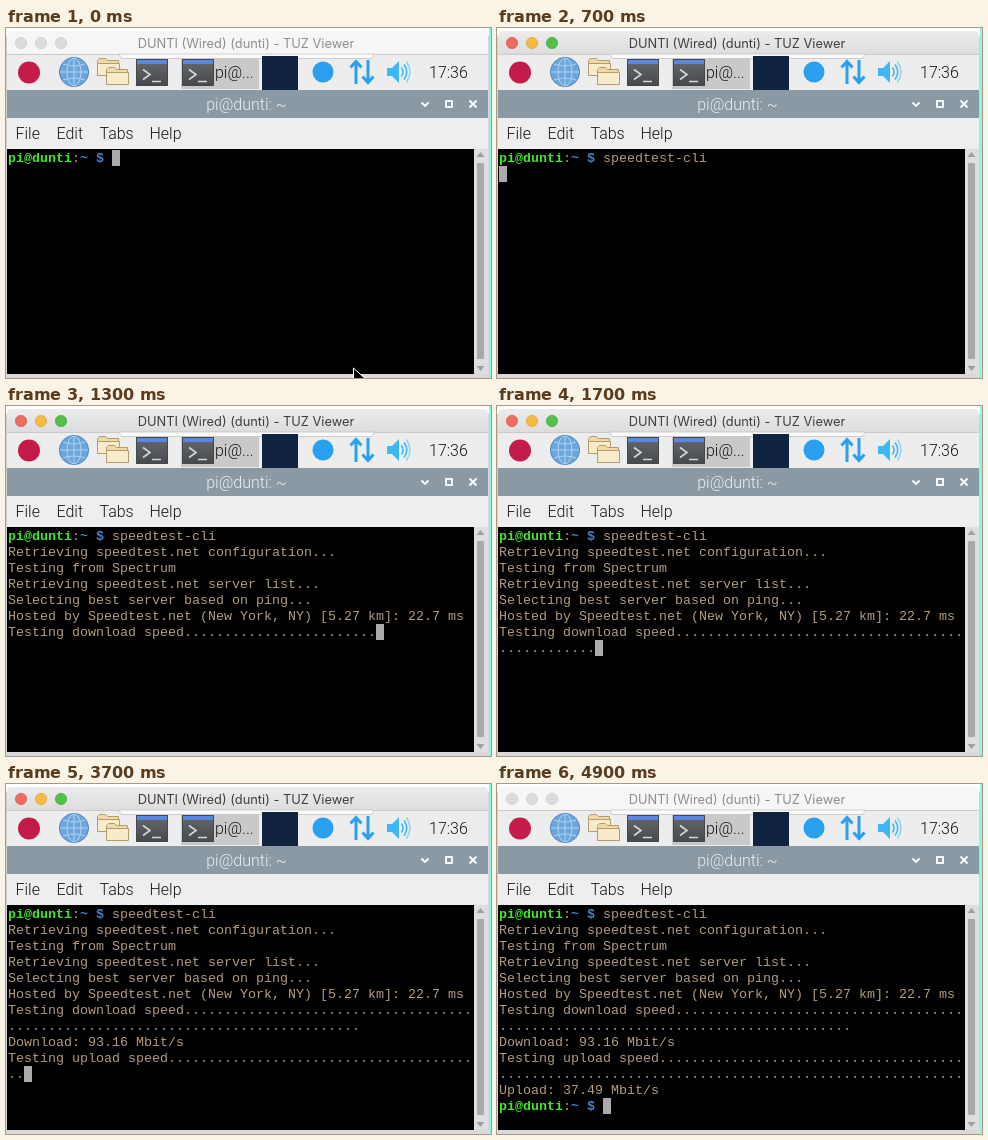
Recreate the animation shown at these times as an HTML page. Size 485x350 px, loop 5 s.

```html
<!DOCTYPE html>
<html lang="en">
<head>
<meta charset="utf-8">
<title>Speed test in a remote terminal</title>
<style>
  html, body { margin: 0; width: 100%; height: 100%; overflow: hidden; background: #fff; }
  #stage { position: absolute; left: 0; top: 0; width: 485px; height: 350px; overflow: hidden; }
  svg { position: absolute; left: 0; top: 0; }
  .ui { font: 300 16px Roboto, sans-serif; fill: #161616; }
  .shade { animation: shade 5s step-end infinite; }
  .caption { font: 400 12.85px Inter, sans-serif; fill: #3f3f3f; animation: caption 5s step-end infinite; }
  .light { animation: light 5s step-end infinite; }
  .pointer { animation: pointer 5s step-end infinite; }
  @keyframes shade { 0%, 98% { opacity: 0; } 2% { opacity: 1; } }
  @keyframes caption { 0%, 98% { fill: #8e8e8e; } 2% { fill: #3f3f3f; } }
  @keyframes light { 0%, 98% { fill: #dcdcdc; stroke: #cfcfcf; } 2% { fill: var(--on); stroke: var(--rim); } }
  @keyframes pointer { 0% { opacity: 1; } 2%, 100% { opacity: 0; } }
  #term {
    position: absolute; left: 2px; top: 122px; margin: 0; padding-top: 1px; width: 466px; height: 223px;
    overflow: hidden; color: #b39b80; white-space: pre;
    font: 13.333px/16px "Liberation Mono", monospace;
  }
  #term div { height: 16px; }
  #term .user { color: #45e62e; font-weight: 700; }
  #term .path { color: #4a7fc0; font-weight: 700; }
  #term .cursor {
    display: inline-block; position: relative; top: -1px; width: 8px; height: 16px;
    background: #ababab; vertical-align: top;
  }
</style>
</head>
<body>
<div id="stage">
  <svg width="485" height="350" viewBox="0 0 485 350">
    <defs>
      <linearGradient id="active" x2="0" y2="1">
        <stop stop-color="#ececec"/>
        <stop offset="1" stop-color="#dcdcdc"/>
      </linearGradient>
      <linearGradient id="dark" x2="0" y2="1">
        <stop stop-color="#66696c"/>
        <stop offset="1" stop-color="#46494d"/>
      </linearGradient>
      <path id="bar" d="M1 27V8q0-5 5-5H477q5 0 5 5V27z"/>
      <g id="console">
        <rect x=".5" y=".5" width="31" height="26" fill="url(#dark)" stroke="#44474c"/>
        <rect x="1" y="1" width="30" height="4" fill="#5b87e2"/>
        <path d="M7 10.5l7 5-7 5M16 22.5h9" fill="none" stroke="#d5d7da" stroke-width="1.6"/>
      </g>
      <g id="folder" stroke="#b39c6c">
        <path d="M.5 17.5V2.500l2-2h6l2 2h11v15z" fill="#f0d9a8"/>
        <path d="M.5 17.5V5.500h22v12z" fill="#f8ebcb"/>
      </g>
    </defs>

    <rect x="483" width="2" height="350" fill="#86f8e8"/>
    <rect x="0" y="8" width="1" height="342" fill="#d2d2d2"/>
    <rect x="482" y="8" width="1" height="342" fill="#d2d2d2"/>
    <rect y="346" width="483" height="4" fill="#d9d9d9"/>

    <use href="#bar" fill="#f6f6f6"/>
    <use class="shade" href="#bar" fill="url(#active)"/>
    <path d="M1 26.500H482" stroke="#cacaca"/>
    <g stroke-width=".8">
      <circle class="light" style="--on:#ef6c62;--rim:#dc5850" cx="15" cy="15" r="5.600"/>
      <circle class="light" style="--on:#f4bc42;--rim:#dda636" cx="35" cy="15" r="5.600"/>
      <circle class="light" style="--on:#54c04a;--rim:#45ab3c" cx="55" cy="15" r="5.600"/>
    </g>
    <text class="caption" x="240" y="20" text-anchor="middle">DUNTI (Wired) (dunti) - TUZ Viewer</text>

    <rect x="1" y="27" width="481" height="35" fill="#ededed"/>
    <rect x="175" y="28" width="78" height="33" fill="#c9c9c9"/>
    <path d="M113 26h255l-2 4.500H115z" fill="#fafafa" stroke="#c4c4c4" stroke-width=".8"/>
    <circle cx="23" cy="44.500" r="11" fill="#c31c4a"/>
    <g fill="none" stroke="#b4d4f0">
      <circle cx="68" cy="44" r="14.600" fill="#6ba6dd" stroke="#4b86c0"/>
      <ellipse cx="68" cy="44" rx="7" ry="14"/>
      <path d="M68 30v28M54 44h28M57 36q11 4 22 0M57 52q11-4 22 0"/>
    </g>
    <use href="#folder" x="91" y="30"/>
    <use href="#folder" x="100" y="39"/>
    <use href="#console" x="130" y="31"/>
    <use href="#console" x="176" y="31"/>
    <text class="ui" x="209" y="50">pi@...</text>
    <rect x="256" y="28" width="36" height="34" fill="#10233f"/>
    <circle cx="317" cy="44" r="10.500" fill="#2b9ff0"/>
    <path d="M350 56V33M344.500 39.500l5.500-6 5.500 6M362 32v23M356.500 48.500l5.500 6 5.500-6"
      fill="none" stroke="#2b9ff0" stroke-width="3"/>
    <path d="M381 40h5l7-7v22l-7-7h-5z" fill="#3bb8f5"/>
    <g fill="none" stroke="#3bb8f5" stroke-width="1.600">
      <path d="M395.500 39.500q3 4.500 0 9M398 36.500q5.500 7.500 0 15"/>
      <path d="M400.500 33.500q7 10.500 0 21" opacity=".5"/>
    </g>
    <text class="ui" x="423" y="50">17:36</text>

    <rect x="1" y="62" width="481" height="28" fill="#8b99a4"/>
    <text class="ui" x="240.500" y="82" text-anchor="middle" style="fill:#eceff1">pi@dunti: ~</text>
    <g fill="none" stroke="#fff" stroke-width="1.800">
      <path d="M415.500 74.500l3.500 3.500 3.500-3.500M463.500 72.500l7 7M470.500 72.500l-7 7"/>
      <rect x="440" y="73" width="6" height="6"/>
    </g>

    <rect x="1" y="90" width="481" height="31" fill="#eee"/>
    <g class="ui">
      <text x="9.500" y="111">File</text>
      <text x="50.500" y="111">Edit</text>
      <text x="93.500" y="111">Tabs</text>
      <text x="143.500" y="111">Help</text>
    </g>

    <rect x="1" y="121" width="467" height="225" fill="#000"/>
    <rect x="468" y="121" width="14" height="225" fill="#dedede"/>
    <rect x="471" y="135" width="7" height="196" rx="1" fill="#a9a9a9"/>
    <path d="M470.500 129l4-5 4 5zM470.500 338l4 5 4-5z" fill="#a0a0a0"/>
  </svg>
  <div id="term"></div>
  <svg width="485" height="350" viewBox="0 0 485 350">
    <path class="pointer" d="M347.500 340v15l3.500-3.500 3 6 3-1.500-3-5.500h5z" fill="#000" stroke="#fff"/>
  </svg>
</div>
<script>
  const LOOP = 5000, COLS = 58;
  const term = document.getElementById('term');
  const prompt = '<span class="user">pi@dunti</span>:<span class="path">~ $</span> ';
  const command = 'speedtest-cli';
  const intro = [
    'Retrieving speedtest.net configuration...',
    'Testing from Spectrum',
    'Retrieving speedtest.net server list...',
    'Selecting best server based on ping...',
    'Hosted by Speedtest.net (New York, NY) [5.27 km]: 22.7 ms'
  ];

  // Each track lists [time, value]; a value holds until the next time.
  const typed = [[0, 0], [200, 2], [300, 5], [400, 8], [500, 10], [600, 13]];
  const printed = [[0, 0], [800, 1], [900, 4], [1200, 5]];
  const download = [[1200, 10], [1300, 24], [1400, 32], [1500, 40], [1700, 48], [2200, 54], [2600, 80]];
  const upload = [[2600, 0], [3400, 6], [3500, 18], [3600, 30], [3700, 40], [3800, 46],
    [3900, 52], [4000, 58], [4200, 66], [4300, 72], [4700, 96]];

  const valueAt = (track, t) => track.reduce((v, [time, next]) => t >= time ? next : v, 0);
  const wrap = text => text.match(new RegExp(`.{1,${COLS}}`, 'g'));
  const progress = (name, track, t) =>
    wrap(`Testing ${name} speed` + '.'.repeat(valueAt(track, t)));

  function screen(t) {
    const rows = [prompt + command.slice(0, valueAt(typed, t))];
    if (t >= 700) rows.push(...intro.slice(0, valueAt(printed, t)));
    if (t >= 1200) rows.push(...progress('download', download, t));
    if (t >= 2600) rows.push('Download: 93.16 Mbit/s', ...progress('upload', upload, t));
    if (t >= 4700) rows.push('Upload: 37.49 Mbit/s', prompt);
    if (t >= 700 && t < 1200) rows.push('');
    rows[rows.length - 1] += '<span class="cursor"></span>';
    return rows.map(row => `<div>${row}</div>`).join('');
  }

  let shown = '';
  function draw() {
    // Share the clock of the style animations so both stay in step.
    const now = document.timeline.currentTime ?? performance.now();
    const start = document.getAnimations()[0]?.startTime ?? 0;
    const html = screen(Math.max(0, now - start) % LOOP);
    if (html !== shown) term.innerHTML = shown = html;
    requestAnimationFrame(draw);
  }
  draw();
</script>
</body>
</html>
```
